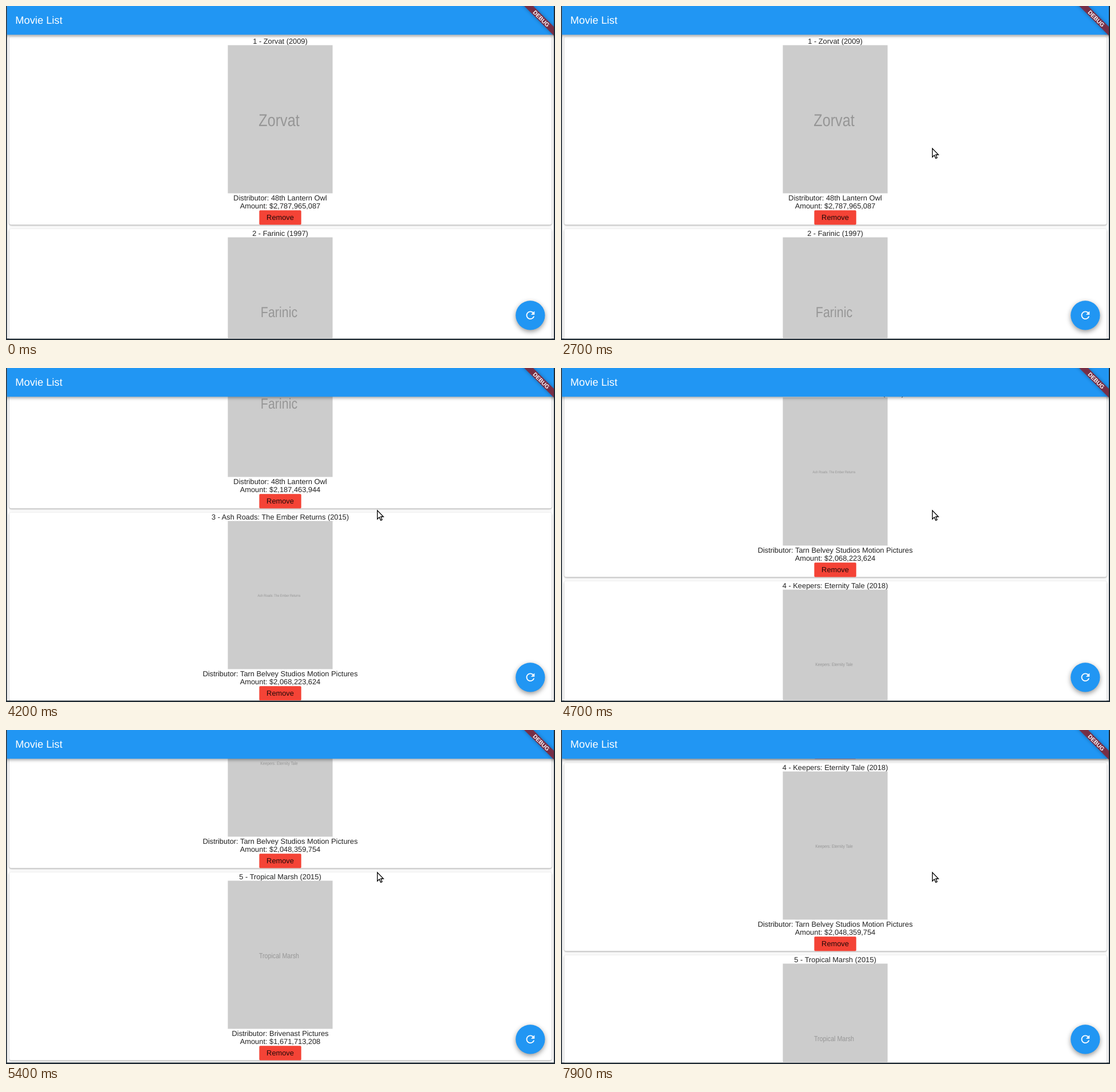
These frames come from a looping animation (959 by 584 pixels, 8 s). An HTML page with a canvas:

```html
<!DOCTYPE html>
<html lang="en">
<head>
<meta charset="utf-8">
<title>Movie List</title>
<style>
html, body { margin: 0; width: 100%; height: 100%; overflow: hidden; background: #1f2a33; }
canvas { display: block; }
</style>
</head>
<body>
<canvas id="stage" width="959" height="584"></canvas>
<script>
const ctx = document.getElementById('stage').getContext('2d');
const LOOP = 8000, TICK = 100;
const FONT = '"Liberation Sans", Arial, sans-serif';
const BLUE = '#2196f3', INK = 'rgba(0,0,0,.87)';
const LEFT = 2, RIGHT = 957, TOP = 50, BOTTOM = 581.5, MID = 479;
const PITCH = 336;

const STUDIO = 'Tarn Belvey Studios Motion Pictures';
// title, year, distributor, amount, poster type size
const movies = [
  ['Zorvat', 2009, '48th Lantern Owl', '2,787,965,087', 30],
  ['Farinic', 1997, '48th Lantern Owl', '2,187,463,944', 25.5],
  ['Ash Roads: The Ember Returns', 2015, STUDIO, '2,068,223,624', 6.3],
  ['Keepers: Eternity Tale', 2018, STUDIO, '2,048,359,754', 8],
  ['Tropical Marsh', 2015, 'Brivenast Pictures', '1,671,713,208', 12.7]
];

// start time, steps, target
const scrolls = [
  [3100, 3, 184], [3700, 3, 400], [4200, 3, 616], [4700, 3, 832],
  [5200, 3, 1149], [7100, 1, 1132], [7300, 3, 1024], [7800, 3, 1002]
];
const moveX = [[1200, 2, 326], [1600, 3, 553], [2000, 3, 648]];
const moveY = [[1200, 2, 56], [1600, 3, 177.5], [2000, 3, 245], [2700, 1, 248]];

const linear = (k, n) => k / n;
const glide = (k, n) => [0.34, 0.905, 1][k + 2 - n];

function track(moves, from, t, ease) {
  let v = from;
  for (const [at, n, to] of moves) {
    if (t < at) break;
    const k = Math.min(n, Math.floor((t - at) / TICK) + 1);
    v += (to - v) * ease(k, n);
  }
  return v;
}

function box(x, y, w, h, r, color) {
  ctx.fillStyle = color;
  ctx.beginPath();
  ctx.roundRect(x, y, w, h, r);
  ctx.fill();
}

function shadow(alpha, blur, dy) {
  ctx.shadowColor = `rgba(0,0,0,${alpha})`;
  ctx.shadowBlur = blur;
  ctx.shadowOffsetY = dy;
}

function noShadow() {
  shadow(0, 0, 0);
}

function text(str, x, y, size, color, align = 'center', weight = 400) {
  ctx.font = `${weight} ${size}px ${FONT}`;
  ctx.textRendering = 'geometricPrecision';
  ctx.textAlign = align;
  ctx.fillStyle = color;
  ctx.fillText(str, x, y);
}

function poster(title, size, y) {
  box(387.5, y, 183, 259, 0, '#ccc');
  ctx.save();
  ctx.translate(477, y + 130.5 + size * 0.36);
  ctx.scale(0.84, 1); // the cover image is squeezed sideways
  text(title, 0, 0, size, '#969696');
  ctx.restore();
}

function card([title, year, maker, amount, size], i, y) {
  shadow(0.38, 2.5, 1);
  box(5.7, y + 3.7, 947.6, 328.7, 3.7, '#fff');
  noShadow();
  const line = (str, dy) => text(str, MID, y + dy, 12.83, INK);
  line(`${i + 1} - ${title} (${year})`, 16);
  poster(title, size, y + 18.6);
  line(`Distributor: ${maker}`, 289.6);
  line(`Amount: $${amount}`, 304.2);
  box(442.4, y + 307.2, 73.3, 25.4, 1.8, '#f44336');
  line('Remove', 324.4);
}

function appBar() {
  shadow(0.4, 6, 2);
  box(LEFT - 10, -20, RIGHT - LEFT + 20, TOP + 20.3, 0, BLUE);
  noShadow();
  text('Movie List', 16.3, 31, 18.3, '#fff', 'left');
}

function banner() {
  ctx.save();
  ctx.translate(RIGHT, 0);
  ctx.rotate(Math.PI / 4);
  shadow(0.5, 6, 0);
  box(-45, 25.6, 90, 11, 0, 'rgba(183,28,28,.63)');
  noShadow();
  box(-45, 25.6, 90, 11, 0, 'rgba(110,30,50,.4)');
  text('DEBUG', 0, 34.7, 10, '#fff', 'center', 700);
  ctx.restore();
}

const refresh = new Path2D('M17.65 6.35C16.2 4.9 14.21 4 12 4c-4.42 0-7.99 3.58-7.99 8s3.57 8 7.99 8c3.73 0 6.84-2.55 7.73-6h-2.08c-.82 2.33-3.04 4-5.65 4-3.31 0-6-2.69-6-6s2.69-6 6-6c1.66 0 3.14.69 4.22 1.78L13 11h7V4l-2.35 2.35z');

function reloadButton() {
  shadow(0.42, 8, 3);
  box(890.3, 515.2, 51.2, 51.2, 25.6, BLUE);
  noShadow();
  ctx.save();
  ctx.translate(905, 529.8);
  ctx.scale(0.9155, 0.9155);
  ctx.fillStyle = '#fff';
  ctx.fill(refresh);
  ctx.restore();
}

const arrow = new Path2D('M.7 1V16.2L4.2 12.9L6.6 18.3L9 17.3L6.7 12H11.3Z');

function pointer(x, y) {
  ctx.save();
  ctx.translate(x, y);
  ctx.fillStyle = '#fff';
  ctx.fill(arrow);
  ctx.lineWidth = 1.3;
  ctx.strokeStyle = '#000';
  ctx.stroke(arrow);
  ctx.restore();
}

function draw(t) {
  ctx.fillStyle = '#1f2a33';
  ctx.fillRect(0, 0, 959, 584);
  ctx.save();
  ctx.beginPath();
  ctx.rect(LEFT - 0.3, 0, RIGHT - LEFT + 0.3, BOTTOM);
  ctx.clip();
  ctx.fillStyle = '#fafafa';
  ctx.fillRect(0, 0, 959, 584);
  const offset = Math.round(track(scrolls, 0, t, glide));
  movies.forEach((m, i) => {
    const y = TOP + i * PITCH - offset;
    if (y < BOTTOM && y + PITCH > 0) card(m, i, y);
  });
  appBar();
  banner();
  reloadButton();
  ctx.restore();
  if (t >= 900) pointer(track(moveX, 207, t, linear), track(moveY, 22, t, linear));
}

const start = performance.now();
function frame() {
  draw((performance.now() - start) % LOOP);
  requestAnimationFrame(frame);
}
frame();
</script>
</body>
</html>
```
